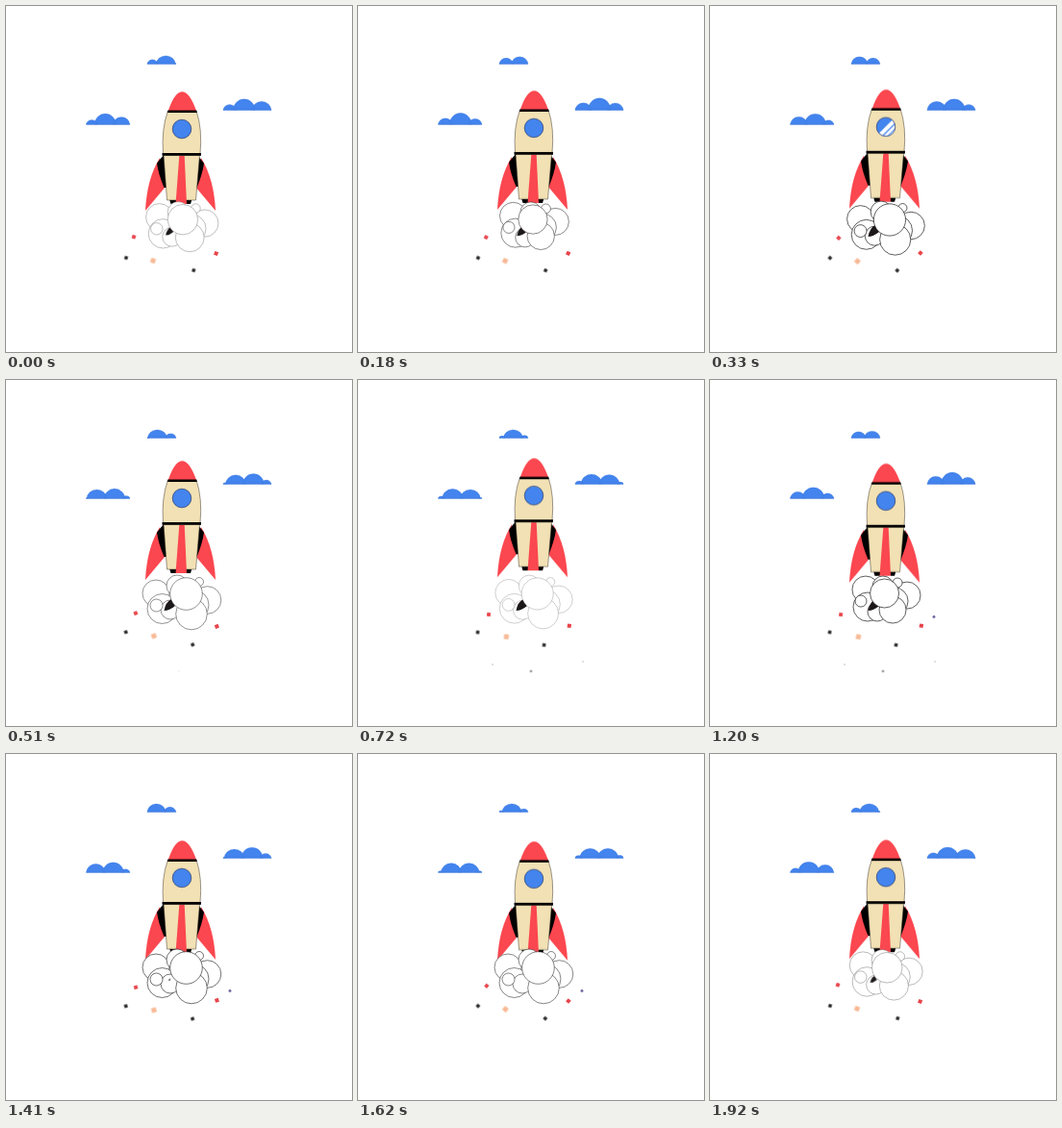
An HTML page for the animation above (1.95 s loop, 360 by 360 pixels).

```html
<!DOCTYPE html>
<html lang="en">
<head>
<meta charset="utf-8">
<title>Rocket</title>
<style>
  html, body { margin: 0; width: 100%; height: 100%; overflow: hidden; background: #fff; }
  svg { display: block; width: 100vw; height: 100vh; }

  .cloud { fill: #4384ee; stroke: #3a6fd0; stroke-width: .2; }
  .red { fill: #fb474f; }
  .shell { fill: #f2e1b4; stroke: #3a322a; stroke-width: .5; }

  #rocket { animation: bob 1950ms linear infinite; }
  @keyframes bob {
    0%, 100% { transform: translateY(0); }
    8% { transform: translateY(-.9px); }
    17% { transform: translateY(-2.3px); }
    27% { transform: translateY(-5.3px); }
    37% { transform: translateY(-7.8px); }
    42% { transform: translateY(-8.1px); }
    51% { transform: translateY(-6.2px); }
    61.5% { transform: translateY(-2.3px); }
    71% { transform: translateY(.7px); }
    79% { transform: translateY(2px); }
    83% { transform: translateY(1.8px); }
    92% { transform: translateY(.8px); }
  }

  #sheen { animation: sheen 1950ms linear infinite; }
  @keyframes sheen {
    0%, 8.5% { transform: translateX(-24px); }
    25%, 100% { transform: translateX(22px); }
  }

  /* Puffs swell quickly, hold, then settle back. */
  .puff {
    fill: #fff; stroke: #1c1a1c; stroke-width: .7;
    animation: puff 975ms -750ms linear infinite;
  }
  @keyframes puff {
    0%, 100% { cx: var(--x0); cy: var(--y0); r: var(--r0); }
    12%, 43% { cx: var(--x1); cy: var(--y1); r: var(--r1); }
  }
  #smoke { animation: haze 1950ms linear infinite; }
  @keyframes haze {
    0%, 100% { stroke-opacity: .4; }
    17% { stroke-opacity: 1; }
    37% { stroke-opacity: .3; }
    51% { stroke-opacity: .35; }
    61.5% { stroke-opacity: 1; }
    83% { stroke-opacity: .75; }
  }

  #gap { transform-origin: 170px 235px; animation: gap 1950ms linear infinite; }
  @keyframes gap {
    0%, 100% { transform: scale(.7); }
    17%, 37% { transform: scale(1); }
    51% { transform: scale(.5); }
    61.5% { transform: scale(1); }
    75%, 88% { transform: scale(0); }
  }

  .bit { animation: sway 975ms ease-in-out infinite alternate; }
  @keyframes sway {
    from { transform: translate(var(--x0), var(--y0)) rotate(20deg); }
    to { transform: translate(var(--x1), var(--y1)) rotate(110deg); }
  }

  .faint { animation: faint 1950ms linear infinite; }
  .late { animation: late 1950ms linear infinite; }
  @keyframes faint {
    0%, 25%, 72%, 100% { opacity: 0; }
    37%, 62% { opacity: .7; }
  }
  @keyframes late {
    0%, 42%, 94%, 100% { opacity: 0; }
    50%, 84% { opacity: .9; }
  }
</style>
</head>
<body>
<svg viewBox="0 0 360 360">
  <defs>
    <clipPath id="glass"><circle cx="183" cy="128" r="9.8"/></clipPath>
    <g id="fin">
      <path class="red" d="M160 158Q146.500 180 145 213L166 188Z"/>
      <path d="M164 155L157 163.500Q158.500 175 164.500 189L168 189V155Z"/>
    </g>
  </defs>

  <g id="sky"></g>

  <g id="rocket">
    <use href="#fin"/>
    <use href="#fin" transform="matrix(-1 0 0 1 363 0)"/>
    <path d="M170 201H193.500L192 206H171.500Z"/>
    <path class="shell" d="M164 155H201.500L197.500 202H167.500Z"/>
    <path class="red" d="M180.300 156H185.700L188 206H176.500Z"/>
    <path class="shell" d="M168.500 109H198Q204.500 128 202 154H163.500Q161.500 128 168.500 109Z"/>
    <path class="red" d="M168.800 109Q175.500 89.300 183.300 89.300Q191 89.300 198 109Z"/>
    <path d="M168.500 108.500H198.200L198.800 111H167.800ZM162.500 153H203V155.800H162.500Z"/>
    <circle cx="183" cy="128" r="9.800" fill="#4384ee"/>
    <g clip-path="url(#glass)">
      <g transform="translate(183 128) rotate(45)">
        <path id="sheen" fill="#fff" d="M0 -12H4V12H0ZM5.300 -12H8V12H5.300ZM9 -12H11V12H9Z"/>
      </g>
    </g>
    <circle cx="183" cy="128" r="9.800" fill="none" stroke="#2c3d6c" stroke-width=".7"/>
  </g>

  <g id="smoke">
    <g id="back"></g>
    <path id="gap" fill="#1c1719" d="M164.500 240Q166 231 172 228L176 235Q170 240 164.500 240Z"/>
    <g id="front"></g>
  </g>

  <g id="bits"></g>
  <path class="faint" fill="#555" d="M139.500 295.500h1v1h-1ZM233.500 292.500h1v1h-1ZM180 301l.6 1.500 1.700.5-1.700.5-.6 1.500-.6-1.500-1.700-.5 1.700-.5Z"/>
  <path class="late" fill="#5c5a96" d="M233 244.500l1.800 1.900-1.800 1.900-1.800-1.900Z"/>
</svg>

<script>
const LOOP = 1950;
const HALF = LOOP / 2;
const GAP = 18.5; // distance between cloud bumps

const byId = id => document.getElementById(id);

function add(parent, tag, attrs) {
  const el = document.createElementNS("http://www.w3.org/2000/svg", tag);
  for (const name in attrs) el.setAttribute(name, attrs[name]);
  return byId(parent).appendChild(el);
}

function setVars(el, vars) {
  for (const name in vars) el.style.setProperty("--" + name, vars[name] + "px");
}

function puff(parent, [x0, y0, r0], [x1, y1, r1]) {
  setVars(add(parent, "circle", { class: "puff" }), { x0, y0, r0, x1, y1, r1 });
}

// Each puff: settled pose, swollen pose (x, y, radius).
puff("back", [162, 218, 14], [156, 222, 14]);
puff("back", [205, 224, 14], [209.5, 229, 14.3]);
puff("back", [164, 236, 15], [162.5, 238, 15.5]);
puff("back", [192, 230, 14], [195.5, 234, 15.5]);
puff("back", [180, 215, 11], [178, 214, 11]);
puff("back", [195, 211, 5], [201, 210, 4.5]);
puff("back", [174, 241, 10], [171, 239, 10]);
puff("front", [190, 239, 14], [193, 243.5, 16.3]);
puff("front", [157, 230, 6], [156.5, 234.5, 6.5]);
puff("front", [181.5, 222, 15], [187.5, 222.5, 16.8]);

function bit(fill, size, x0, y0, x1, y1) {
  const attrs = { class: "bit", fill, x: -size / 2, y: -size / 2, width: size, height: size };
  setVars(add("bits", "rect", attrs), { x0, y0, x1, y1 });
}

bit("#e8444b", 3.8, 133, 240.3, 136.5, 244.5);
bit("#222", 3.4, 125, 262, 124.5, 262.5);
bit("#f8b995", 5, 153, 265, 154.6, 267.5);
bit("#222", 3.4, 195.3, 275, 193.3, 275.8);
bit("#e8444b", 4, 218.6, 257.5, 220, 255.5);

// tall scales every bump; arch adds height towards the middle.
const clouds = [
  { left: 147, right: 176.8, base: 60.5, edge: 157, tall: .95, arch: 0 },
  { left: 83.5, right: 128.8, base: 123.5, edge: 94, tall: .93, arch: .4 },
  { left: 226, right: 276, base: 108.5, edge: 238.5, tall: .93, arch: .45 }
].map(c => ({ ...c, el: add("sky", "path", { class: "cloud" }) }));

// Bumps travel right and are squeezed flat at either end of the cloud.
function cloudPath({ left, right, base, edge, tall, arch }, phase) {
  const clamp = x => Math.min(right, Math.max(left, x));
  let d = `M${left} ${base}V${base - 1.2}H${right}V${base}Z`;
  for (let x = edge + GAP * (phase - 3); x < right; x += GAP) {
    const a = clamp(x), b = clamp(x + GAP);
    if (b - a < .5) continue;
    const central = 1 - Math.abs(a + b - left - right) / (right - left);
    const lift = arch * central ** 2;
    const from = clamp(a - .8 - 4 * lift), to = clamp(b + .8 + 4 * lift);
    const height = (b - a) / 2 * (tall + lift);
    d += `M${from} ${base}A${(to - from) / 2} ${height} 0 0 1 ${to} ${base}Z`;
  }
  return d;
}

const start = performance.now();

function draw() {
  const phase = (performance.now() - start) % HALF / HALF;
  for (const c of clouds) c.el.setAttribute("d", cloudPath(c, phase));
  requestAnimationFrame(draw);
}
draw();
</script>
</body>
</html>
```
